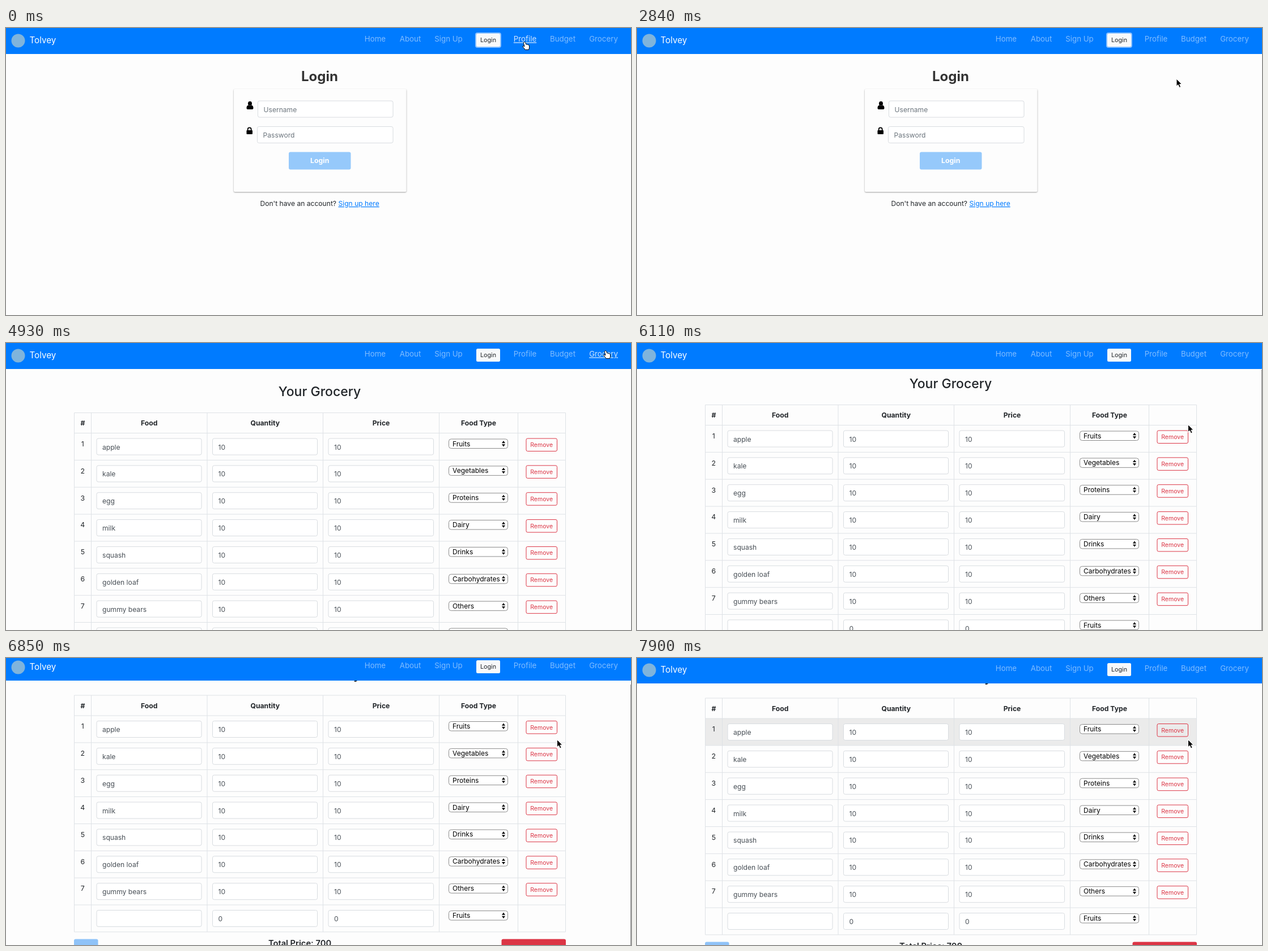
These frames come from a looping animation (1103 by 508 pixels, 8 s). An HTML page:

```html
<!DOCTYPE html>
<html lang="en">
<head>
<meta charset="utf-8">
<title>Grocery list</title>
<style>
  html, body { margin: 0; width: 100%; height: 100%; overflow: hidden; background: #fdfdfd; }
  svg { display: block; width: 1103px; height: 508px; font-family: Inter, sans-serif; }
  .link { fill: #80bdff; }
  .link.hover { fill: #cfe6ff; text-decoration: underline; }
  .card { filter: drop-shadow(0 1.5px 1px rgba(0, 0, 0, .38)); }
</style>
</head>
<body>
<svg id="stage" viewBox="0 0 1103 508"></svg>
<script>
const LOOP = 8000;
const INK = '#212529', BLUE = '#007bff', RED = '#dc3545', LINE = '#dee2e6';

const rect = (x, y, w, h, fill, extra = '') =>
  `<rect x="${x}" y="${y}" width="${w}" height="${h}" fill="${fill}" ${extra}/>`;
const text = (x, y, str, size, fill = INK, extra = '') =>
  `<text x="${x}" y="${y}" font-size="${size}" fill="${fill}" ${extra}>${str}</text>`;
const middle = (x, y, str, size, fill, weight = 400) =>
  text(x, y, str, size, fill, `text-anchor="middle" font-weight="${weight}"`);
const field = (x, y, w, value, fill = '#495057') =>
  rect(x, y, w, 29, '#fff', 'rx="3" stroke="#d8dce0"') + text(x + 10, y + 19.5, value, 12.1, fill);

function navBar() {
  const links = { Home: 651.5, About: 713.5, 'Sign Up': 781, Profile: 916, Budget: 982.5, Grocery: 1054.5 };
  return rect(0, -40, 1103, 86, BLUE) +
    '<circle cx="21.5" cy="22.5" r="12" fill="#7fb4dc"/>' +
    text(41.5, 27, 'Tolvey', 15.2, '#fff') +
    Object.entries(links).map(([name, x]) =>
      `<text class="link" data-name="${name}" x="${x}" y="24.3" font-size="13.3" text-anchor="middle">${name}</text>`).join('') +
    rect(828, 8, 46, 27, '#8ec3ff', 'id="focus" rx="4"') +
    rect(830, 10, 42, 23, '#f8f9fa', 'rx="2.5"') +
    middle(851, 25.3, 'Login', 10.8, INK);
}

function loginPage() {
  return middle(553.5, 94, 'Login', 24, '#333', 700) +
    rect(402, 108, 304.5, 182, '#fdfdfd', 'rx="2" class="card"') +
    '<ellipse cx="430.5" cy="133.7" rx="3.5" ry="4"/>' +
    '<path d="M424.5 142q0-5 3.3-5.2q2.7 2 5.4 0q3.3.2 3.3 5.2q0 2-2 2h-8q-2 0-2-2z"/>' +
    rect(424.5, 181, 10.5, 7, '#000', 'rx="1"') +
    '<path d="M426.7 181.5v-2.2a3 3 0 0 1 6 0v2.2" fill="none" stroke="#000" stroke-width="1.8"/>' +
    field(444.5, 129, 238.5, 'Username', '#6c757d') +
    field(443.5, 174.5, 239.5, 'Password', '#6c757d') +
    rect(499, 219.5, 109.5, 31, '#96c9fb', 'rx="3"') +
    middle(553.7, 239.3, 'Login', 12.3, '#fff', 700) +
    text(448.5, 315, "Don't have an account?", 12.1) +
    text(586.5, 315, 'Sign up here', 12.1, BLUE, 'text-decoration="underline"');
}

function groceryPage() {
  const foods = [['apple', 'Fruits'], ['kale', 'Vegetables'], ['egg', 'Proteins'], ['milk', 'Dairy'],
    ['squash', 'Drinks'], ['golden loaf', 'Carbohydrates'], ['gummy bears', 'Others'], ['', 'Fruits']];
  const columns = [120.5, 150.5, 355, 559.5, 764.5, 903.5, 987.5];
  const top = 123.5, first = 159.5, pitch = 47.86, bottom = first + pitch * foods.length;

  const lines = columns.map(x => `M${x} ${top}V${bottom}`).join('') + `M120.5 ${top}H987.5` +
    [...foods, 0].map((_, i) => `M120.5 ${first + i * pitch}H987.5`).join('');
  const headings = ['#', 'Food', 'Quantity', 'Price', 'Food Type', ''].map((name, i) =>
    middle((columns[i] + columns[i + 1]) / 2, 146.3, name, 12.2, INK, 700)).join('');

  const row = ([food, type], i) => {
    const y = first + i * pitch, amount = food ? 10 : 0;
    return (food ? middle(135.3, y + 23.3, i + 1, 12.3, INK) : '') +
      field(160, y + 9.5, 185, food) + field(364.5, y + 9.5, 185, amount) + field(569, y + 9.5, 185.5, amount) +
      rect(781.5, y + 10.5, 104, 16.5, '#fff', 'rx="4" stroke="#8c8c8c"') +
      text(788, y + 23, type, 12, '#000') +
      `<path d="M875 ${y + 17.7}l3-4.2l3 4.2zM875 ${y + 19.7}l3 4.2l3-4.2z"/>` +
      (food ? rect(918, y + 9.5, 54.5, 22.5, 'none', `rx="2.5" stroke="${RED}"`) +
        middle(945.2, y + 24.5, 'Remove', 10.5, RED) : '');
  };

  return middle(553.5, 94, 'Your Grocery', 23, INK, 500) +
    rect(120.5, first, 867, pitch, '#ebebeb', 'id="rowHover"') +
    `<path d="${lines}" fill="none" stroke="${LINE}"/>` + headings + foods.map(row).join('') +
    rect(120, 555, 42.5, 31, '#8fc3f8', 'rx="3"') + middle(141.2, 575, 'Add', 12.1, '#fff') +
    middle(518.5, 567.5, 'Total Price: 700', 14.7, INK, 600) +
    rect(874.5, 555, 113.5, 31, RED, 'rx="3"') + middle(931.2, 575, 'Remove All', 12.1, '#fff');
}

const $ = id => document.getElementById(id);
$('stage').innerHTML = rect(0, 0, 1103, 508, '#fdfdfd') +
  `<g id="window">
     <g id="login">${loginPage()}</g>
     <g id="grocery">${groceryPage()}</g>
     ${navBar()}
   </g>` +
  rect(1102, 47, 1, 461, '#8a8a8a', 'id="scrollbar"') +
  `<path id="hand" fill="#fff" stroke="#000" stroke-linejoin="round"
     d="M3 1.2Q4.8-.2 5.6 1.6L6.8 5Q8-.1+4.6 8.6 5.4Q9.8 4.6 10.4 5.9Q12 5.4 12.3 7.2L12.6 10.2Q12.5 12 11.4 14.5H5.2Q3.6 11.5 1 9.4Q.2 7.8 2 7.7L4 8.8L2.4 2.6Q2.2 1.7 3 1.2Z"/>
   <path id="arrow" fill="#000" stroke="#fff" stroke-linejoin="round"
     d="M0 0V13.2L3 10.4L5.2 15.4L7.6 14.3L5.5 9.5H9.5Z"/>`;
$('hand').setAttribute('d', 'M3 1.2Q4.8-.2 5.6 1.6L6.8 5Q7.8 4.5 8.6 5.4Q9.8 4.6 10.4 5.9Q12 5.4 12.3 7.2' +
  'L12.6 10.2Q12.5 12 11.4 14.5H5.2Q3.6 11.5 1 9.4Q.2 7.8 2 7.7L4 8.8L2.4 2.6Q2.2 1.7 3 1.2Z');

// Every track holds its value until the next entry.
const pointer = [
  [0, 'hand', 911, 24, 'Profile'],
  [1050, 'hand', 926, 26, 'Profile'], [1200, 'hand', 966, 26, 'Budget'],
  [1350, 'arrow', 946, 25], [1490, 'hand', 917.5, 23, 'Profile'],
  [2840, 'arrow', 952, 90], [2990, 'arrow', 1000, 250], [3140, 'arrow', 1051, 415], [3290, ''],
  [3580, 'hand', 1062, 14, 'Grocery'], [3730, 'hand', 1058, 14, 'Grocery'],
  [3880, 'hand', 1056, 13.5, 'Grocery'], [4030, 'hand', 1054, 13, 'Grocery'],
  [5370, 'arrow', 1030, 55], [5520, 'arrow', 985, 125], [5670, 'arrow', 972.5, 144.5],
];
const scrolling = [
  [0, 0, 0], [6110, 14, 0], [6260, 43, 0], [6410, 51.5, 0],
  [6560, 51.5, 3], [6710, 51.5, 6], [6860, 51.5, 4], [7000, 51.5, 2], [7150, 51.5, 0],
  [7300, 51.5, 2], [7450, 51.5, 6], [7600, 51.5, 4], [7750, 51.5, 2], [7900, 51.5, 1],
];
const at = (track, t) => track.findLast(entry => entry[0] <= t);
const show = (id, visible) => $(id).setAttribute('visibility', visible ? 'visible' : 'hidden');
const move = (id, x, y) => $(id).setAttribute('transform', `translate(${x} ${y})`);
const links = document.querySelectorAll('.link');

function draw(t) {
  const [, shape, x, y, hovered] = at(pointer, t);
  const [, scroll, bounce] = at(scrolling, t);
  show('login', t < 4780);
  show('grocery', t >= 4780);
  show('focus', t < 4630);
  show('rowHover', t >= 6860);
  show('scrollbar', t >= 6110 && t < 7000);
  move('grocery', 0, -scroll);
  move('window', 0, -bounce);
  for (const link of links) link.classList.toggle('hover', link.dataset.name === hovered);
  for (const id of ['hand', 'arrow']) show(id, id === shape);
  if (shape) move(shape, x, y);
}

const start = performance.now();
function tick() {
  draw((performance.now() - start) % LOOP);
  requestAnimationFrame(tick);
}
tick();
</script>
</body>
</html>
```
